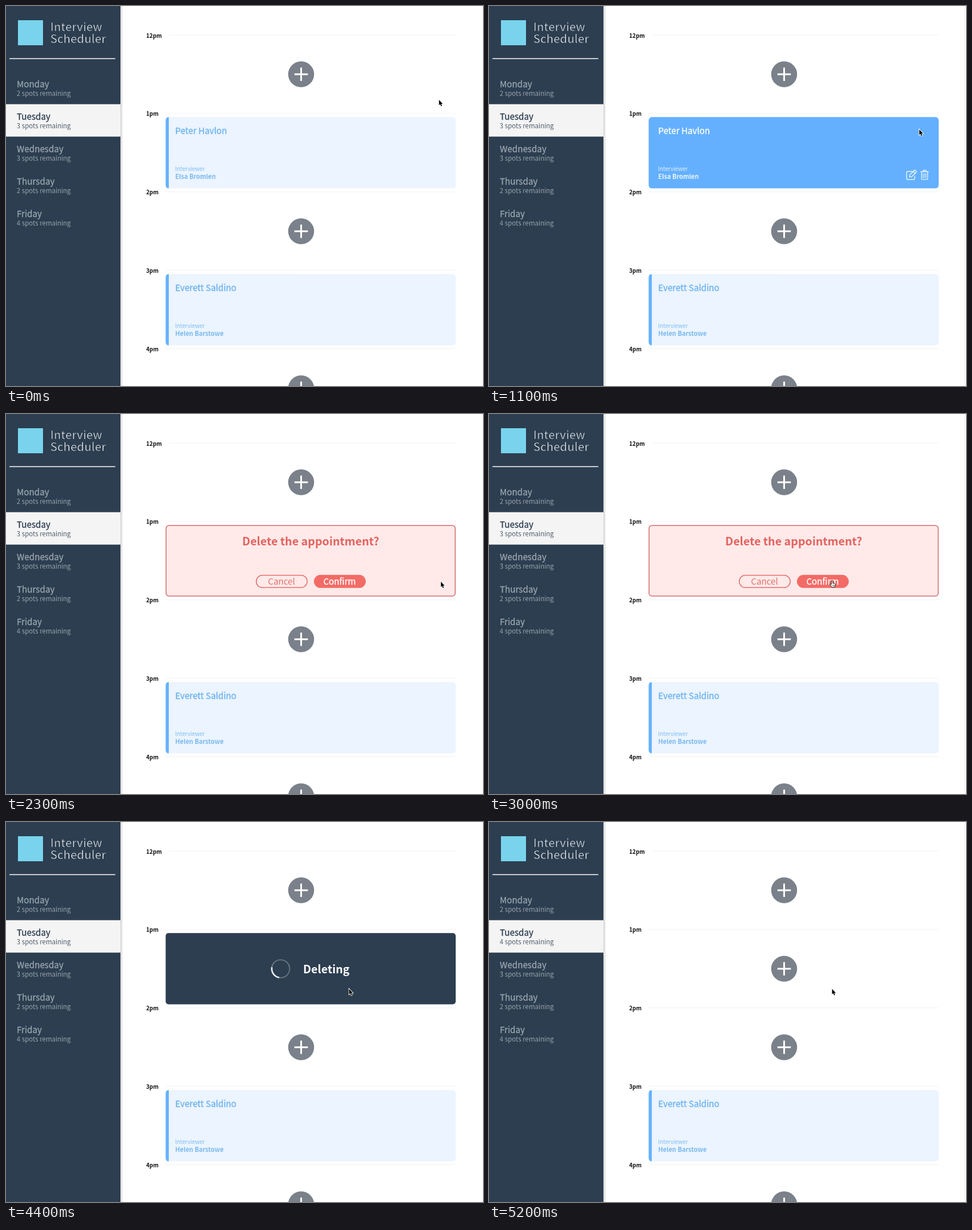
An HTML page for the animation above (5300 ms loop, 838 px wide and 668 px high).

```html
<!DOCTYPE html>
<html lang="en">
<head>
<meta charset="utf-8">
<title>Interview Scheduler</title>
<style>
  html, body { margin: 0; width: 100%; height: 100%; overflow: hidden; background: #fff; }
  svg { display: block; font-family: "Noto Sans CJK SC", "Noto Sans CJK JP", "Noto Sans CJK", "Noto Sans", sans-serif; }
  .day, .name { font-size: 15.2px; stroke-width: .3; }
  .spots { font-size: 11.5px; stroke-width: .2; }
  .hour { font-size: 9.9px; font-weight: 700; }
  .role { font-size: 9.8px; stroke-width: .15; }
  .who { font-size: 11px; font-weight: 700; stroke-width: .2; }
  .big { font-size: 19.7px; font-weight: 700; }
  .btn { font-size: 15.2px; text-anchor: middle; }
</style>
</head>
<body>
<svg id="stage" width="838" height="668" viewBox="0 0 838 668">
  <defs>
    <linearGradient id="shade">
      <stop offset="0" stop-color="#000" stop-opacity=".18"/>
      <stop offset="1" stop-color="#000" stop-opacity="0"/>
    </linearGradient>
    <g id="plus">
      <circle r="22.8" fill="#7a818a"/>
      <path d="M-11.8 0H11.8M0-11.8V11.8" stroke="#fff" stroke-width="3"/>
    </g>
  </defs>
  <rect width="838" height="668" fill="#fff"/>
  <path d="M836 0V668" stroke="#f1f1f1"/>
  <g id="hours"></g>

  <rect x="201" width="5" height="668" fill="url(#shade)"/>
  <rect width="201" height="668" fill="#2c3e50"/>
  <rect x="21" y="25" width="44" height="44" fill="#79d3ec"/>
  <g font-size="20" letter-spacing=".38" fill="#fff" stroke="#2c3e50" stroke-width=".6">
    <text x="78" y="44.4">Interview</text>
    <text x="78" y="65.4">Scheduler</text>
  </g>
  <path d="M6 92.4H192" stroke="#fff" stroke-width="1.5"/>
  <g id="days"></g>

  <use href="#plus" x="518.5" y="120"/>
  <use href="#plus" x="518.5" y="396"/>
  <use href="#plus" x="518.5" y="672"/>
  <g id="booked"></g>

  <g id="empty"><use href="#plus" x="518.5" y="258"/></g>
  <g id="idle"></g>
  <g id="hover">
    <g fill="none" stroke="#fff" stroke-width="1.5" stroke-linejoin="round" stroke-linecap="round" opacity=".85">
      <path d="M743.5 290.7H735.2Q733.7 290.7 733.7 292.2V303.6Q733.7 305.1 735.2 305.1H746.2Q747.7 305.1 747.7 303.6V299.5"/>
      <path d="M739.3 296.8L747 289.1Q748 288.2 749 289.1L750.4 290.5Q751.2 291.5 750.4 292.4L742.7 300 738.8 300.6ZM745.2 291L748.5 294.3"/>
    </g>
    <g id="bin" fill="none" stroke="#fff" stroke-width="1.4" stroke-linejoin="round" stroke-linecap="round">
      <path d="M758.5 291.2H772M762.3 291L763.3 288.7H767.2L768.2 291M759.9 291.5V303.4Q759.9 304.9 761.4 304.9H769.1Q770.6 304.9 770.6 303.4V291.5"/>
      <path d="M762.8 294.2V301.9M765.25 294.2V301.9M767.7 294.2V301.9" stroke-width="1.1"/>
    </g>
  </g>
  <g id="confirm">
    <rect x="281.2" y="196" width="508" height="124" rx="5" fill="#ffeae9" stroke="#d8696c" stroke-width="1.5"/>
    <text class="big" x="535.3" y="230.6" text-anchor="middle" fill="#e3625f">Delete the appointment?</text>
    <rect x="439.6" y="283.5" width="89.6" height="21.6" rx="10.8" fill="none" stroke="#e26f6d" stroke-width="1.5"/>
    <text class="btn" x="484" y="299.8" fill="#e26f6d">Cancel</text>
    <rect x="541" y="282.8" width="91" height="23" rx="11.5" fill="#f36b66"/>
    <text class="btn" x="586" y="299.8" fill="#fff" stroke="#fff" stroke-width=".3">Confirm</text>
  </g>
  <g id="deleting">
    <rect x="280.5" y="195.3" width="509.5" height="125.2" rx="5" fill="#2c3e50"/>
    <circle cx="482.5" cy="258" r="15.8" fill="none" stroke="#fff" stroke-opacity=".27" stroke-width="2"/>
    <path id="arc" d="M15.6 0A15.6 15.6 0 0 1 0 15.6" fill="none" stroke="#eceef0" stroke-width="2.6"/>
    <text class="big" x="522" y="265.5" fill="#fff">Deleting</text>
  </g>

  <g id="ring" fill="none">
    <circle r="21" stroke="#fff" stroke-width="4.4"/>
    <circle r="20.6" stroke="#111" stroke-width="2"/>
  </g>
  <path id="arrow" d="M0 .2V9.6L2.1 7.7 3.7 11.4 5.2 10.7 3.7 7.2H6.6Z" fill="#000" stroke="#fff" stroke-width="1.7" paint-order="stroke"/>
  <g id="hand" stroke="#111" stroke-width=".9" stroke-linejoin="round">
    <path d="M-1.2 .4A1.2 1.2 0 0 1 1.2 .4V4.2L4.8 4.9Q6 5.3 5.9 6.6L5.3 9.2 4.6 11.4H.2L-3.5 6.7Q-4 5.3-2.6 5.3L-1.2 6.5Z" fill="#fff"/>
    <path d="M1.2 7V9.5M2.6 7V9.5M4 7V9.5" stroke-width=".6"/>
  </g>
</svg>
<script>
const $ = id => document.getElementById(id);

// A stroke in the ink colour thickens letters, one in the backdrop colour thins them.
const text = (cls, x, y, fill, stroke, str, extra = "") =>
  `<text class="${cls}" x="${x}" y="${y}" fill="${fill}" stroke="${stroke}" ${extra}>${str}</text>`;

$("hours").innerHTML = ["12pm", "1pm", "2pm", "3pm", "4pm"].map((h, i) => {
  const y = 51 + i * 137.85;
  return `<path d="M${i ? 280 : 287} ${y}H790" stroke="#f2f2f2"/>` +
    text("hour", 246.3, y + 4.6, "#111", "none", h);
}).join("");

const days = [["Monday", 2], ["Tuesday", 3], ["Wednesday", 3], ["Thursday", 2], ["Friday", 4]];
$("days").innerHTML = days.map(([day, n], i) => {
  const y = 143 + i * 56.9, on = i === 1;
  const bg = on ? "#f4f4f4" : "#2c3e50", ink = on ? "#2c3e50" : "#9aa5af";
  return (on ? `<rect y="172.6" width="201" height="57" fill="${bg}"/>` : "") +
    text("day", 19, y, ink, ink, day) +
    text("spots", 18.8, y + 15.3, on ? "#2c3e50" : "#b3bbc2", bg, `${n} spots remaining`, `id="spots${i}"`);
}).join("");

function card(y, name, who, active) {
  const ink = active ? "#fff" : "#6ab1ef", bg = active ? "#64b0ff" : "#ebf4ff";
  return `<rect x="280.5" y="${y}" width="509.5" height="125.2" rx="5.5" fill="${bg}"/>` +
    (active ? "" : `<path d="M286 ${y}V${y + 125.2}Q280.5 ${y + 125.2} 280.5 ${y + 119.2}V${y + 6}Q280.5 ${y} 286 ${y}Z" fill="#65b2fc"/>`) +
    text("name", 297.3, y + 29.3, ink, ink, name) +
    text("role", 297, y + 94.7, ink, bg, "Interviewer") +
    text("who", 297.3, y + 108.7, ink, bg, who);
}
const visit = ["Peter Havlon", "Elsa Bromlen"];
$("booked").innerHTML = card(471.2, "Everett Saldino", "Helen Barstowe", false);
$("idle").innerHTML = card(195.3, ...visit, false);
$("hover").insertAdjacentHTML("afterbegin", card(195.3, ...visit, true));

// Pointer stops: time, x, y
const LOOP = 5300;
const stops = [[0, 760.7, 164.8], [200, 760.7, 164.8], [800, 756, 217], [1300, 756, 217],
  [1800, 764, 294.5], [2400, 764, 294.5], [2900, 602.7, 293.3], [LOOP, 602.7, 293.3]];

function pointer(t) {
  const i = stops.findIndex(s => s[0] > t);
  const [t0, x0, y0] = stops[i - 1], [t1, x1, y1] = stops[i];
  const p = (t - t0) / (t1 - t0), e = p * p * (3 - 2 * p);
  return [x0 + (x1 - x0) * e, y0 + (y1 - y0) * e];
}

const show = (id, on) => $(id).setAttribute("display", on ? "inline" : "none");
const move = (id, x, y) => $(id).setAttribute("transform", `translate(${x} ${y})`);

function draw(ms) {
  const t = Math.floor((ms % LOOP) / 100) * 100;
  const [x, y] = pointer(t);
  const view = t >= 4600 ? "empty" : t >= 3300 ? "deleting" : t >= 2300 ? "confirm" : y > 195.3 ? "hover" : "idle";
  for (const id of ["empty", "deleting", "confirm", "hover", "idle"]) show(id, id === view);

  const onBin = view === "hover" && y > 287 && x > 757;
  const onButton = view === "confirm" && x > 541 && x < 632;
  const hand = onBin || onButton;
  $("bin").setAttribute("opacity", onBin ? 1 : .85);
  show("hand", hand);
  show("arrow", !hand);
  show("ring", (t >= 2000 && t < 2300) || (t >= 3100 && t < 3300));
  for (const id of ["hand", "arrow", "ring"]) move(id, x, y);

  $("arc").setAttribute("transform", `translate(482.5 258) rotate(${100 + (t - 3400) * .36})`);
  $("spots1").textContent = `${view === "empty" ? 4 : 3} spots remaining`;
}

function tick() {
  draw(performance.now());
  requestAnimationFrame(tick);
}
tick();
</script>
</body>
</html>
```
